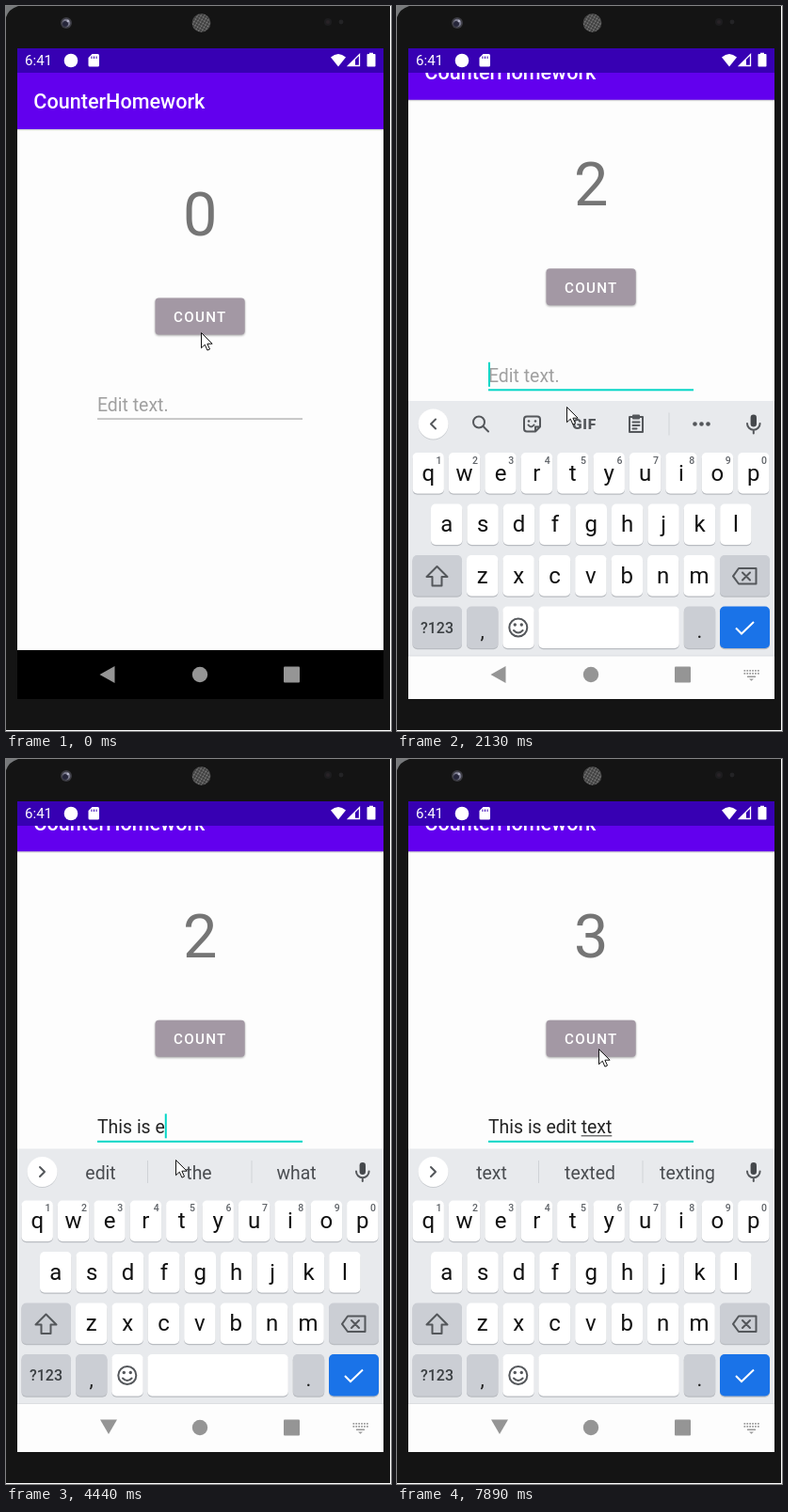
An HTML page for the animation above (8 s loop, 409 px wide and 771 px high).

```html
<!DOCTYPE html>
<html lang="en">
<head>
<meta charset="utf-8">
<title>Counter app</title>
<style>
html, body { margin: 0; width: 100%; height: 100%; overflow: hidden; background: #fff; }
svg { display: block; width: 409px; height: 771px; font-family: Roboto, sans-serif; }
text { white-space: pre; }
.mid { text-anchor: middle; }
.medium { font-weight: 500; }
.icon { fill: none; stroke: #54575b; stroke-width: 2; stroke-linejoin: round; stroke-linecap: round; }
</style>
</head>
<body>
<svg id="stage" viewBox="0 0 409 771" xmlns="http://www.w3.org/2000/svg"></svg>
<script>
const LOOP = 8000;
const TEAL = '#03d6c6';
const FIELD_X = 97;
const FIELD_FONT = 19.45;

// Each entry holds from its time until the next; unset values carry over.
const timeline = [
  [0, { count: 0, pressed: 0, cursor: [207, 347], pan: 0, focus: 0, caret: 0,
        board: 0, drop: 0, down: 0, typed: '', mark: [0, 0], words: null }],
  [500, { pressed: .6 }],
  [620, { pressed: 1, count: 1 }],
  [740, { pressed: 0 }],
  [1020, { pressed: .6 }],
  [1150, { pressed: 0, count: 2, cursor: [199, 369] }],
  [1290, { cursor: [181, 406] }],
  [1440, { cursor: [180, 424] }],
  [1580, { cursor: [180, 426] }],
  [1710, { focus: 1, caret: 1 }],
  [2010, { pan: 5, board: .6, drop: 70 }],
  [2130, { pan: 31.2, board: 1, drop: 5.5 }],
  [2280, { pan: 32.7, drop: 0, down: 1 }],
  [2520, { typed: 'T' }],
  [2660, { typed: 'Th', mark: [0, 1], words: ['T', 'The', 'This'] }],
  [2800, { typed: 'Thi', mark: [0, 2], words: ['Th', 'Thanks', 'Thank'] }],
  [3080, { typed: 'This', mark: [0, 3] }],
  [3210, { mark: [0, 4], words: ['This', 'This is', 'Thus'] }],
  [3350, { typed: 'This ', mark: [0, 0] }],
  [3630, { words: ['is', 'morning', 'week'] }],
  [3900, { typed: 'This i' }],
  [4030, { typed: 'This is', mark: [5, 7], words: ['is', 'isn’t', 'in'] }],
  [4170, { typed: 'This is ', mark: [0, 0] }],
  [4440, { typed: 'This is e', words: ['edit', 'the', 'what'] }],
  [4690, { mark: [8, 9], words: ['e', 'even', 'every'] }],
  [4810, { typed: 'This is ed', mark: [8, 9] }],
  [4930, { typed: 'This is edi', mark: [8, 10], words: ['ed', 'edit', 'editing'] }],
  [5080, { typed: 'This is edit', mark: [8, 11] }],
  [5200, { mark: [8, 12], words: ['edit', 'edited', 'editing'] }],
  [5340, { typed: 'This is edit ', mark: [0, 0] }],
  [5470, { words: ['text', 'the', 'and'] }],
  [5590, { typed: 'This is edit t' }],
  [5710, { typed: 'This is edit te', mark: [13, 14], words: ['t', 'the', 'to'] }],
  [5830, { typed: 'This is edit tex', mark: [13, 15], words: ['te', 'tell', 'test'] }],
  [6110, { typed: 'This is edit text', mark: [13, 16], words: ['tex', 'text', 'texted'] }],
  [6390, { mark: [13, 17], words: ['text', 'texted', 'texting'] }],
  [6790, { caret: 0, cursor: [192, 382] }],
  [6930, { cursor: [208, 320] }],
  [7060, { cursor: [215, 286] }],
  [7340, { caret: 1, pressed: .6 }],
  [7470, { pressed: 1, count: 3 }],
  [7610, { pressed: 0 }],
  [7890, { caret: 0, cursor: [214, 308] }]
];

const rect = (x, y, w, h, fill, extra = '') =>
  `<rect x="${x}" y="${y}" width="${w}" height="${h}" fill="${fill}" ${extra}/>`;
const circle = (x, y, r, fill, extra = '') =>
  `<circle cx="${x}" cy="${y}" r="${r}" fill="${fill}" ${extra}/>`;
const label = (x, y, size, fill, str, extra = '') =>
  `<text x="${x}" y="${y}" font-size="${size}" fill="${fill}" ${extra}>${str}</text>`;
const path = (d, extra = '') => `<path d="${d}" ${extra}/>`;
const icon = d => path(d, 'class="icon"');

function key(x, y, w, fill = '#fff', h = 43.5) {
  return rect(x, y + 1.2, w, h, '#b9bcc1', 'rx="5"') + rect(x, y, w, h, fill, 'rx="5"');
}

function letterRow(letters, x, y, hints) {
  return [...letters].map((c, i) => {
    const left = x + i * 38.4;
    return key(left, y, 33.4) +
      label(left + 16.7, y + 29.5, 24, '#111', c, 'class="mid"') +
      (hints ? label(left + 28, y + 11.5, 10.5, '#5f6368', (i + 1) % 10, 'class="mid medium"') : '');
  }).join('');
}

function keyboard() {
  const grey = '#cbced4';
  return rect(12, 414.5, 389, 271, '#e8eaed') +
    rect(12, 685.5, 389, 160, '#fdfdfd') + rect(12, 685, 389, 1, '#dcdee1') +
    circle(38.5, 440, 16, '#c9ccd0') + circle(38.5, 439, 16, '#fff') +
    '<path id="chevron" class="icon"/>' +
    '<g id="tools">' +
      '<circle cx="87" cy="437" r="6" class="icon"/>' + icon('M91.5 441.5L97 447') +
      icon('M138 431h11a3 3 0 0 1 3 3v8l-5 5h-9a3 3 0 0 1-3-3v-10a3 3 0 0 1 3-3ZM147 447v-5h5M139.5 440q3 4 6 0') +
      circle(140, 436, 1.3, '#54575b') + circle(147, 436, 1.3, '#54575b') +
      label(199, 444.5, 15.5, '#54575b', 'GIF', 'class="mid" font-weight="800" letter-spacing=".8"') +
      icon('M247 431.5h14v16h-14ZM251 430h6v3h-6ZM250.5 437h7M250.5 440.5h7M250.5 444h4') +
      rect(288.5, 427, 1, 24, '#d0d3d7') +
      [316.5, 323.5, 330.5].map(x => circle(x, 439, 2.3, '#54575b')).join('') +
    '</g>' +
    '<g id="words">' +
      [100.5, 205, 308.5].map(x => label(x, 446.5, 19.4, '#4a4d51', '', 'class="mid"')).join('') +
      rect(150, 427, 1, 24, '#d0d3d7') + rect(260.5, 427, 1, 24, '#d0d3d7') +
    '</g>' +
    rect(375.6, 429, 6.4, 13, '#45484c', 'rx="3.2"') + icon('M372 438.5a6.8 6.8 0 0 0 13.6 0M378.8 445.5v3.5') +
    letterRow('qwertyuiop', 16.5, 469.5, true) +
    letterRow('asdfghjkl', 36, 524) +
    key(16.5, 578.5, 52.5, grey) + letterRow('zxcvbnm', 74, 578.5) + key(343, 578.5, 53, grey) +
    icon('M42.5 590.5l11 11h-6v9.5h-10v-9.5h-6Z') +
    icon('M363 592.5h18.5v16.5h-18.5l-6-8.2ZM367 597l8 8M375 597l-8 8') +
    key(16.5, 633, 52.5, grey, 44.5) + key(74, 633, 33.4, grey, 44.5) +
    key(112.3, 633, 33.4, '#fff', 44.5) + key(150.3, 633, 149.5, '#fff', 44.5) +
    key(304.8, 633, 33.4, grey, 44.5) + key(343, 633, 53, '#1a73e8', 44.5) +
    label(42.5, 661, 16, '#3c4043', '?123', 'class="mid medium"') +
    label(90.7, 666.5, 22, '#222', ',', 'class="mid"') +
    label(321.5, 666.5, 22, '#222', '.', 'class="mid"') +
    '<circle cx="128.8" cy="655.5" r="9.5" class="icon"/>' + icon('M124 658.5q4.8 5 9.6 0') +
    circle(125.3, 652.5, 1.7, '#54575b') + circle(132.3, 652.5, 1.7, '#54575b') +
    path('M360 656l6 6L379 649.5', 'fill="none" stroke="#fff" stroke-width="2"');
}

function miniKeyboard() {
  let dots = '';
  for (let row = 0; row < 2; row++)
    for (let col = 0; col < 6; col++)
      dots += rect(368.5 + col * 2.9, 706 + row * 3, 1.7, 1.7, '#999');
  return dots + rect(372, 712.5, 9, 1.5, '#999') + path('M374 715.5h5l-2.5 2.3Z', 'fill="#999"');
}

function phone() {
  return rect(0, 0, 409, 771, '#fff') + rect(0, 0, 20, 20, '#77797b') +
    path('M0 12Q3 3 13 0H408V770H0Z', 'fill="#141414"') +
    circle(64, 18, 6, '#3b3b42') + circle(64, 18, 4.3, '#77778a') +
    circle(63, 19, 3, '#26263a') + circle(65.8, 16, 1.3, '#b5b5c8') +
    circle(207.5, 18, 10, '#3a3a3a') + circle(207.5, 18, 9.7, 'url(#mesh)') +
    circle(342, 17, 4, '#1d1d1f') + circle(342, 17, 2, '#292327') + circle(356, 17, 2.4, '#242426');
}

function statusBar() {
  return rect(12, 45, 389, 26, '#3700b3') +
    label(20, 63.3, 15.1, '#fff', '6:41') +
    circle(69, 58, 7.3, '#fff') +
    path('M91.5 51h6a1.5 1.5 0 0 1 1.5 1.5v10.5a1.5 1.5 0 0 1-1.5 1.5h-8.5a1.5 1.5 0 0 1-1.5-1.5v-8Z', 'fill="#fff"') +
    path('M91 53.5v2.5M93.5 53.5v2.5M96 53.5v2.5', 'stroke="#3700b3"') +
    path('M345 54.5Q353 47.5 361 54.5L353 64.5Z', 'fill="#fff"') +
    path('M363.5 63.5L375.5 51.5V63.5Z', 'fill="none" stroke="#fff" stroke-width="1.3"') +
    path('M363 64L371 56V64Z', 'fill="#fff"') +
    path('M386 51v-1.2h4V51h1.7q.8 0 .8.8v12q0 .8-.8.8h-7.4q-.8 0-.8-.8v-12q0-.8.8-.8Z', 'fill="#fff"');
}

const stage = document.getElementById('stage');
stage.innerHTML = `
<defs>
  <pattern id="mesh" width="3" height="3" patternUnits="userSpaceOnUse" patternTransform="rotate(30)">
    <circle cx="1.5" cy="1.5" r=".9" fill="#8a8a8a"/>
  </pattern>
  <linearGradient id="shade" x2="0" y2="1"><stop stop-color="#000" stop-opacity=".22"/><stop offset="1" stop-color="#000" stop-opacity="0"/></linearGradient>
  <clipPath id="screen"><rect x="12" y="45" width="389" height="692"/></clipPath>
</defs>
${phone()}
<g clip-path="url(#screen)">
  ${rect(12, 45, 389, 692, '#fdfdfd')}
  <g id="page">
    ${rect(12, 71, 389, 60, '#6200ee')}${rect(12, 131, 389, 2, 'url(#shade)')}
    ${label(29.3, 109, 21.6, '#fff', 'CounterHomework', 'class="medium"')}
    ${label(206.3, 243.5, 64.8, '#757575', '', 'id="count" class="mid"')}
    ${rect(158.5, 310.5, 95.2, 38.9, '#a398a4', 'id="button" rx="4"')}
    ${rect(158.5, 310.5, 95.2, 38.9, '#fff', 'id="ripple" rx="4"')}
    ${label(178, 335.8, 15.13, '#fff', 'COUNT', 'class="medium" letter-spacing="1.35"')}
    ${label(FIELD_X, 431, FIELD_FONT, '#a0a0a0', 'Edit text.', 'id="hint"')}
    ${label(FIELD_X, 431, FIELD_FONT, '#242424', '', 'id="typed"')}
    ${rect(FIELD_X, 433, 0, 1, '#333', 'id="mark"')}
    ${rect(FIELD_X, 438.5, 218, 1.1, '#a0a0a0', 'id="line"')}
    ${rect(FIELD_X, 410, 2, 26, TEAL, 'id="caret"')}
  </g>
  ${statusBar()}
  ${rect(12, 685, 389, 52, '#000')}
  <g id="board">${keyboard()}</g>
  <g fill="#959595">
    <path id="back"/>${circle(206, 711, 8.2, '#959595')}${rect(295, 702.5, 17, 17, '#959595', 'rx="1"')}
  </g>
  <g id="mini">${miniKeyboard()}</g>
</g>
<path id="cursor" d="M0 0V16.2L3.8 12.7L6.4 18.6L9 17.5L6.4 11.7H11.6Z" fill="#fff" stroke="#111" stroke-width="1"/>`;

const el = {};
stage.querySelectorAll('[id]').forEach(node => el[node.id] = node);
const wordSlots = el.words.querySelectorAll('text');
const ruler = document.createElement('canvas').getContext('2d');

function fieldX(str) {
  ruler.font = `${FIELD_FONT}px Roboto, sans-serif`;
  return FIELD_X + ruler.measureText(str).width;
}
const set = (node, attrs) => Object.entries(attrs).forEach(([k, v]) => node.setAttribute(k, v));
const show = (node, on) => node.setAttribute('visibility', on ? 'visible' : 'hidden');

function stateAt(t) {
  const past = timeline.filter(([start]) => start <= t);
  return Object.assign({}, ...past.map(([, change]) => change));
}

function draw(t) {
  const s = stateAt(t);
  set(el.page, { transform: `translate(0 ${-s.pan})` });
  el.count.textContent = s.count;
  set(el.ripple, { opacity: s.pressed * .25 });
  el.button.style.filter = s.pressed
    ? 'drop-shadow(0 2px 1.8px rgba(0,0,0,.4))'
    : 'drop-shadow(0 1px .8px rgba(0,0,0,.35))';

  show(el.hint, !s.typed);
  el.typed.textContent = s.typed;
  const [from, to] = s.mark.map(n => fieldX(s.typed.slice(0, n)));
  set(el.mark, { x: from, width: to - from });
  set(el.line, { fill: s.focus ? TEAL : '#a0a0a0', height: s.focus ? 2 : 1.1 });
  set(el.caret, { x: fieldX(s.typed) });
  show(el.caret, s.caret);

  set(el.board, { opacity: s.board, transform: `translate(0 ${s.drop})` });
  set(el.chevron, { d: s.words ? 'M36 434l5 5-5 5' : 'M41 434l-5 5 5 5' });
  set(el.tools, { display: s.words ? 'none' : 'inline' });
  set(el.words, { display: s.words ? 'inline' : 'none' });
  wordSlots.forEach((slot, i) => slot.textContent = s.words ? s.words[i] : '');
  show(el.mini, s.board === 1);
  set(el.back, { d: s.down ? 'M100 702.5H118L109 718Z' : 'M99.5 711L115.5 702V720Z' });
  set(el.cursor, { transform: `translate(${s.cursor[0] + .5} ${s.cursor[1] + .5})` });
}

const begin = performance.now();
function tick() {
  draw((performance.now() - begin) % LOOP);
  requestAnimationFrame(tick);
}
tick();
</script>
</body>
</html>
```
